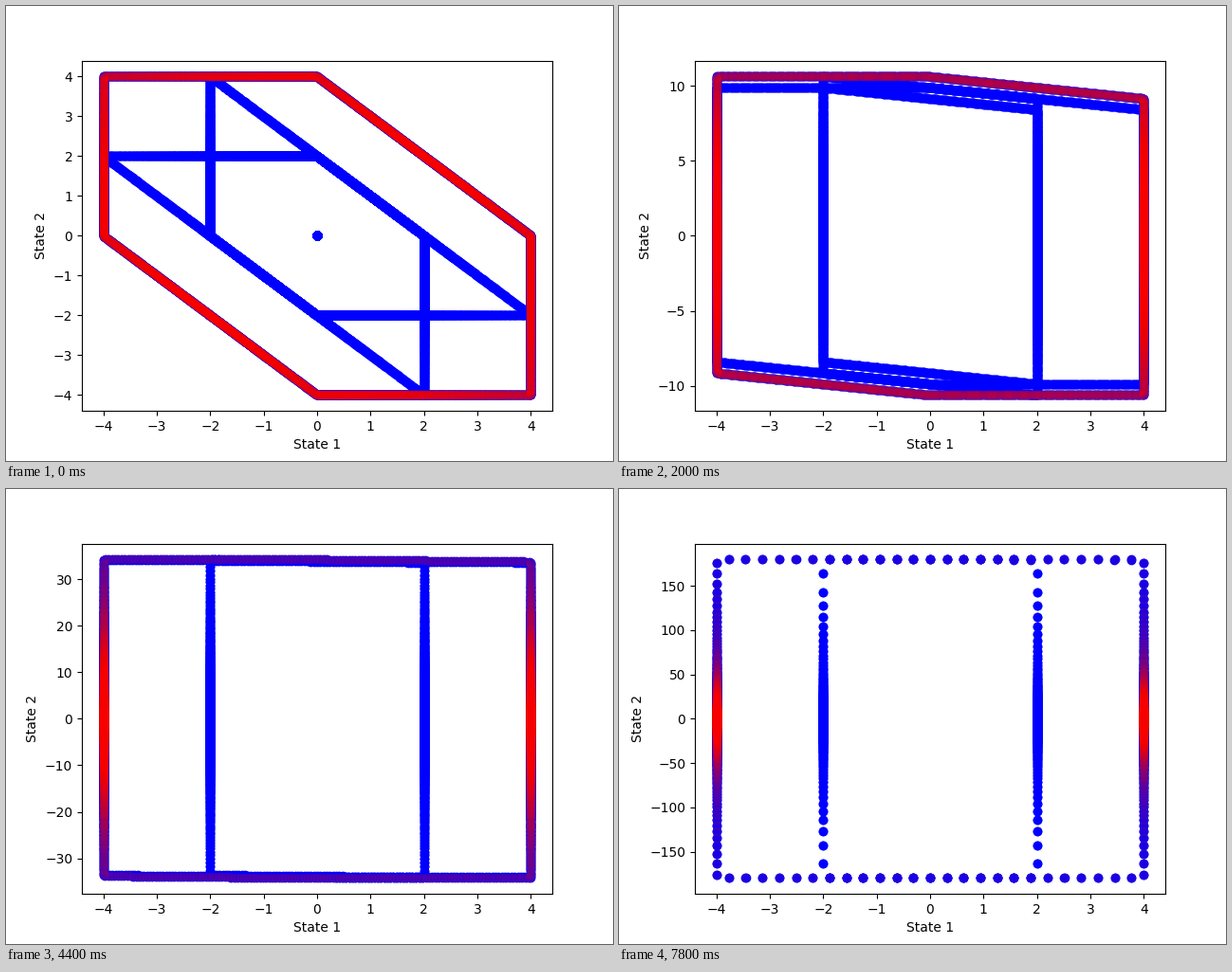
Animation of 640 by 480 pixels, one loop 8000 ms. Source, as a matplotlib script:

```python
import numpy as np
import matplotlib.pyplot as plt
from matplotlib.animation import FuncAnimation

FRAMES, INTERVAL = 40, 200
GROWTH = 1.05 ** 2      # gain of state 2 per step
DECAY = np.exp(-0.1)    # shrinking coupling slope per step

angles = np.deg2rad(np.arange(3600) / 10)
COS, SIN = np.cos(angles), np.sin(angles)


def reach(limit, normal):
    """Distance along each ray to the band |normal . x| <= limit."""
    return limit / np.maximum(np.abs(normal), 1e-9)


def boundary(*bands):
    r = np.min([reach(limit, normal) for limit, normal in bands], axis=0)
    return np.column_stack([r * COS, r * SIN])


def reach_sets(step):
    """Outer boundary and the three inner ones at a step."""
    top = 4 * GROWTH ** step
    slope = DECAY ** step
    shear = SIN + slope * COS
    mid = top - 2 * slope
    low = top - 4 * slope
    outer = boundary((4, COS), (top, SIN), (top, shear))
    inner = [
        boundary((2, COS), (mid, shear)),
        boundary((4, COS), (mid, SIN), (mid, shear)),
        boundary((2, COS), (low, shear)),
    ]
    return top, outer, inner


fig, ax = plt.subplots(figsize=(6.4, 4.8), dpi=100)
ax.set_xlabel("State 1")
ax.set_ylabel("State 2")
ax.set_xlim(-4.4, 4.4)
samples = ax.scatter([], [], color="blue")
hull = ax.scatter([], [], color="red", alpha=0.1)


def update(step):
    top, outer, inner = reach_sets(step)
    samples.set_offsets(np.vstack(inner + [outer]))
    hull.set_offsets(outer)
    ax.set_ylim(-1.1 * top, 1.1 * top)
    return samples, hull


anim = FuncAnimation(fig, update, frames=FRAMES, interval=INTERVAL,
                     init_func=lambda: update(0), repeat=True,
                     repeat_delay=0, blit=False)
plt.show()
```
